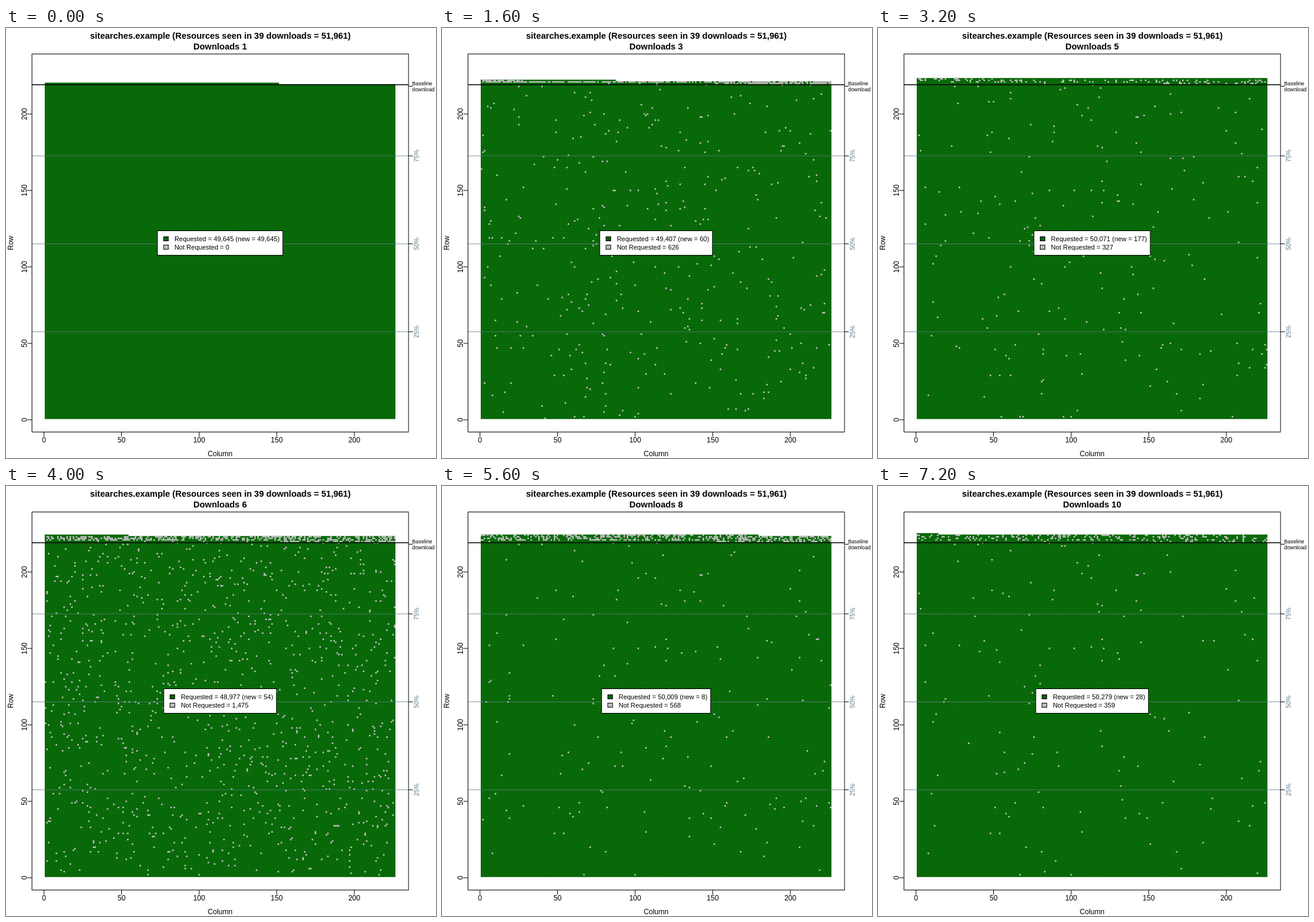
Recreate the animation shown at these times as an HTML page with a canvas. Size 720 by 720 pixels, loop 8000 ms.

```html
<!DOCTYPE html>
<html lang="en">
<head>
<meta charset="utf-8">
<title>Download coverage</title>
<style>
  html, body { margin: 0; width: 100%; height: 100%; overflow: hidden; background: #fff; }
  canvas, svg { position: absolute; left: 0; top: 0; width: 720px; height: 720px; }
  text { font-family: "Liberation Sans", Arial, sans-serif; font-size: 12px; fill: #000; }
  .title { font-size: 14.5px; font-weight: bold; }
  .small { font-size: 8.8px; }
  .pct { font-size: 10.4px; fill: #607b8b; }
  .key { font-size: 11px; }
</style>
</head>
<body>
<canvas id="cells" width="720" height="720"></canvas>
<svg id="chart" viewBox="0 0 720 720"></svg>
<script>
(() => {
  const COLS = 226, ROWS = 225, X0 = 63.6, Y0 = 656, DX = 2.598, DY = 2.56;
  const BASE = 49645, STEP = 800, STEADY = 150;
  const GREEN = '#006400', GREY = '#bebebe';

  // late: share of resources added after the baseline that are not requested
  const states = [
    { asked: 49645, fresh: 49645, missed: 0, late: 0 },
    { asked: 49612, fresh: 328, missed: 361, late: 0 },
    { asked: 49407, fresh: 60, missed: 626, late: .8 },
    { asked: 49869, fresh: 188, missed: 352, late: .35 },
    { asked: 50071, fresh: 177, missed: 327, late: .25 },
    { asked: 48977, fresh: 54, missed: 1475, late: .46 },
    { asked: 49426, fresh: 117, missed: 1143, late: .7 },
    { asked: 50009, fresh: 8, missed: 568, late: .42 },
    { asked: 50205, fresh: 33, missed: 405, late: .25 },
    { asked: 50279, fresh: 28, missed: 359, late: .21 }
  ];

  function rand(n, salt) {
    let h = Math.imul(n + 1, 0x9e3779b1) ^ Math.imul(salt + 7, 0x85ebca6b);
    h = Math.imul(h ^ (h >>> 16), 0x7feb352d);
    h = Math.imul(h ^ (h >>> 15), 0x846ca68b);
    return ((h ^ (h >>> 16)) >>> 0) / 4294967296;
  }

  const cellX = col => X0 + (col - .5) * DX;
  const cellY = row => Y0 - (row + .5) * DY;
  const commas = n => n.toLocaleString('en-US');

  // Late cells first, then cells that are often skipped, then new ones for this state
  function missing(k) {
    const { asked, fresh, missed, late } = states[k], out = new Set();
    const pick = (n, salt) => out.add(1 + Math.floor(rand(n, salt) * BASE));
    for (let id = BASE + 1; id <= asked + missed - fresh; id++)
      if (rand(id, k) < late) out.add(id);
    for (let n = 0; n < STEADY && out.size < missed; n++)
      if (rand(n, 40 + k) < .85) pick(n, 20);
    for (let n = 0; out.size < missed; n++) pick(n, 60 + k);
    return out;
  }

  // Solid field with faint light specks where cell corners meet
  function makeField() {
    const c = document.createElement('canvas');
    c.width = c.height = 720;
    const g = c.getContext('2d');
    g.fillStyle = GREEN;
    g.fillRect(cellX(1), cellY(ROWS), COLS * DX, ROWS * DY);
    g.fillStyle = 'rgba(255,255,255,.35)';
    for (let r = 1; r < ROWS; r++)
      for (let q = 2; q <= COLS; q++) g.fillRect(cellX(q) - .4, cellY(r) - .4, .8, .8);
    return c;
  }

  const ctx = document.getElementById('cells').getContext('2d');
  const field = makeField();

  function drawCells(k) {
    const total = states[k].asked + states[k].missed;
    const full = Math.floor(total / COLS), part = total % COLS;
    ctx.clearRect(0, 0, 720, 720);
    ctx.save();
    ctx.beginPath();
    ctx.rect(0, cellY(full), 720, 720);
    if (part) ctx.rect(0, cellY(full + 1), cellX(part + 1), DY);
    ctx.clip();
    ctx.drawImage(field, 0, 0);
    ctx.restore();
    ctx.fillStyle = GREY;
    for (const id of missing(k)) {
      const col = (id - 1) % COLS + 1, row = Math.floor((id - 1) / COLS) + 1;
      ctx.fillRect(cellX(col), cellY(row), DX, DY);
    }
  }

  const svg = document.getElementById('chart');

  function add(name, attrs, content = '') {
    const e = document.createElementNS('http://www.w3.org/2000/svg', name);
    for (const a in attrs) e.setAttribute(a, attrs[a]);
    e.textContent = content;
    return svg.appendChild(e);
  }
  const line = (x1, y1, x2, y2, stroke = '#000', width = 1) =>
    add('line', { x1, y1, x2, y2, stroke, 'stroke-width': width });
  const label = (x, y, str, cls = '', anchor = 'middle') =>
    add('text', { x, y, class: cls, 'text-anchor': anchor }, str);
  const upright = (x, y, str, cls) =>
    label(0, 0, str, cls).setAttribute('transform', `translate(${x} ${y}) rotate(-90)`);
  const box = (x, y, width, height, fill) =>
    add('rect', { x, y, width, height, fill, stroke: '#000' });

  label(359, 18, 'sitearches.example (Resources seen in 39 downloads = 51,961)', 'title');
  const heading = label(358.5, 36, '', 'title');

  line(43, 95, 674, 95, '#000', 1.5);
  for (let p = 25; p <= 75; p += 25) {
    const y = Y0 - p * 5.892;
    line(43, y, 674, y, '#607b8b', .8);
    line(674, y, 681, y);
    upright(691, y, p + '%', 'pct');
  }
  box(43.5, 43.5, 630.5, 633, 'none');
  line(674, 97.5, 681, 97.5);
  label(680, 96, 'Baseline', 'small', 'start');
  label(680, 106, 'download', 'small', 'start');

  for (let v = 0; v <= 200; v += 50) {
    const x = X0 + v * DX, y = Y0 - v * DY;
    line(x, 677, x, 684);
    label(x, 694, v);
    line(36, y, 43, y);
    upright(35, y, v);
  }
  label(358.5, 717, 'Column');
  upright(12, 360, 'Row');

  const panel = box(0, 339.5, 0, 41, '#fff');
  const swatches = [box(0, 349.5, 8, 7, GREEN), box(0, 363.5, 8, 7, GREY)];
  const notes = [label(0, 357, '', 'key', 'start'), label(0, 371, '', 'key', 'start')];

  function show(k) {
    const s = states[k];
    drawCells(k);
    heading.textContent = 'Downloads ' + (k + 1);
    notes[0].textContent = `Requested = ${commas(s.asked)} (new = ${commas(s.fresh)})`;
    notes[1].textContent = `Not Requested = ${commas(s.missed)}`;
    const w = notes[0].getComputedTextLength() + 34, x = 358.5 - w / 2;
    panel.setAttribute('x', x);
    panel.setAttribute('width', w);
    swatches.forEach(e => e.setAttribute('x', x + 10.5));
    notes.forEach(e => e.setAttribute('x', x + 28.5));
  }

  let current = -1;
  function tick() {
    const k = Math.floor(performance.now() / STEP) % states.length;
    if (k !== current) show(current = k);
    requestAnimationFrame(tick);
  }
  tick();
})();
</script>
</body>
</html>
```
